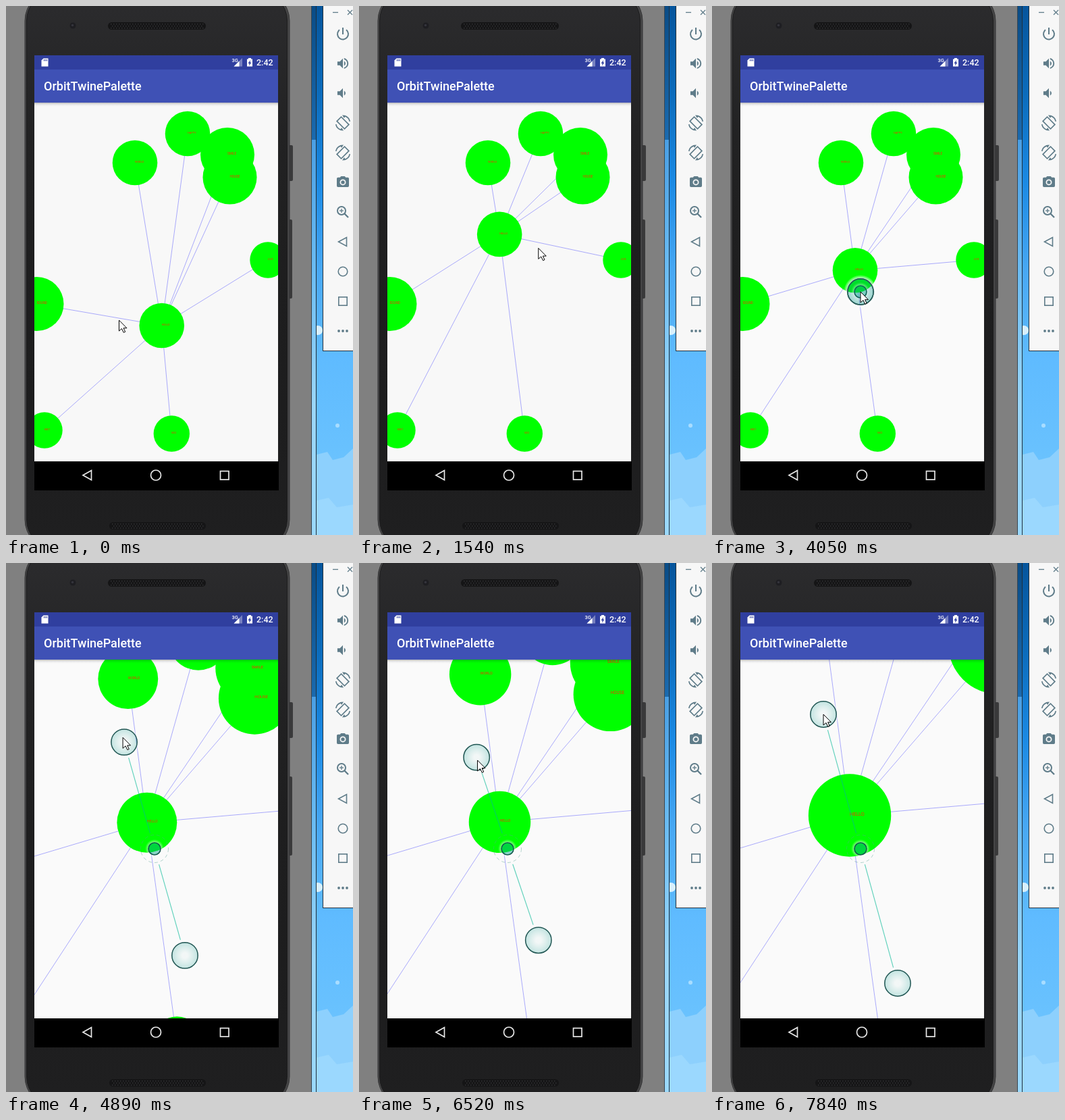
Recreate the animation shown at these times as an HTML page with a canvas. Size 514 by 783 pixels, loop 7990 ms.

```html
<!DOCTYPE html>
<html lang="en">
<head>
<meta charset="utf-8">
<title>Node graph</title>
<style>
html, body { margin: 0; width: 100%; height: 100%; overflow: hidden; background: #808080; }
canvas { display: block; width: 514px; height: 783px; }
</style>
</head>
<body>
<canvas id="stage" width="514" height="783"></canvas>
<script>
const ctx = document.getElementById('stage').getContext('2d');
const TAU = Math.PI * 2;
const LOOP = 7990;
const DRAG_END = 2240;
const PINCH_START = 3930;
const ANCHOR = { x: 220, y: 423 };
const HUB = { x: 212, y: 391.3, r: 33.3, word: 'HELLO' };

const node = (x, y, r, word) => ({ x, y, r, word });
const NODES = [
  node(191, 232, 33.3, 'WORLD'), node(269, 189, 33.3, 'HAPPY'),
  node(328, 220, 40, 'SMILE'), node(331.5, 253.5, 40, 'HOUSE'),
  node(388, 376, 26.7, 'LOVE'), node(45.5, 441, 40, 'SOUND'),
  node(57, 628, 26.7, 'MEET'), node(245.3, 633, 26.7, 'NICE')
];

// The screen refreshes in runs: first, last, steps
const RUNS = [
  [150, 1130, 8], [1280, 2240, 8], [2540, 2670, 2], [3220, 3490, 3],
  [3930, 4200, 3], [4760, 5670, 7], [5820, 6790, 8], [6930, 7840, 8]
];

// Turning points of the pinch: time, scale, finger x, finger y
const PINCH = [
  [4650, 1, 220, 423], [4912, 1.335, 175, 265], [5400, 1.84, 145, 163],
  [5958, 1.68, 144, 185], [7060, 1.05, 211, 405], [7100, 1.05, 219, 419],
  [7840, 1.838, 165, 224]
];

function snap(t) {
  let held = 0;
  for (const [first, last, steps] of RUNS) {
    const gap = (last - first) / (steps - 1);
    if (t >= first) held = first + gap * Math.min(steps - 1, Math.floor((t - first + 25) / gap));
  }
  return held;
}

function ramp(t, from, to) {
  const u = Math.min(1, Math.max(0, (t - from) / (to - from)));
  return u * u * (3 - 2 * u);
}

const mix = (a, b, u) => a + (b - a) * u;

// Cubic curve through timed keys; returns the values after the time
function at(keys, t) {
  const last = keys.length - 1;
  if (t <= keys[0][0]) return keys[0].slice(1);
  if (t >= keys[last][0]) return keys[last].slice(1);
  let i = 0;
  while (keys[i + 1][0] <= t) i++;
  const a = keys[i], b = keys[i + 1], span = b[0] - a[0], u = (t - a[0]) / span;
  const slope = (k, c) => k < 1 || k >= last ? 0
    : (keys[k + 1][c] - keys[k - 1][c]) / (keys[k + 1][0] - keys[k - 1][0]) * span;
  return a.slice(1).map((v, n) => {
    const c = n + 1, d = b[c] - v, m0 = slope(i, c), m1 = slope(i + 1, c);
    return v + u * (m0 + u * (3 * d - 2 * m0 - m1 + u * (m0 + m1 - 2 * d)));
  });
}

// One turn per second on a flattening ellipse, then rest
function drag(t) {
  const angle = TAU * (0.2 + t / 1000), rest = ramp(t, 1850, DRAG_END);
  return {
    x: mix(206 + 80 * Math.cos(angle), HUB.x, rest),
    y: mix(395 + (82 - 0.016 * t) * Math.sin(angle), HUB.y, rest)
  };
}

function hover(t) {
  const down = ramp(t, 2410, 2670), up = ramp(t, 3090, 3490);
  return { x: HUB.x + 5 * down + 3 * up, y: 390 + 51 * down - 18 * up };
}

function pose(t) {
  if (t < PINCH_START) {
    return { scale: 1, hub: drag(t), pointer: t < DRAG_END ? drag(t + 130) : hover(t) };
  }
  const [scale, x, y] = at(PINCH, t), [, px, py] = at(PINCH, t + 20), grow = scale - 1;
  return {
    scale, hub: { x: HUB.x - 9.5 * grow, y: HUB.y - 21.2 * grow },
    finger: { x, y }, pointer: { x: px, y: py }
  };
}

function paint(fill, stroke, width) {
  if (fill) { ctx.fillStyle = fill; ctx.fill(); }
  if (stroke) { ctx.strokeStyle = stroke; ctx.lineWidth = width; ctx.stroke(); }
}

function box(x, y, w, h, fill) {
  ctx.fillStyle = fill;
  ctx.fillRect(x, y, w, h);
}

function round(x, y, w, h, r, fill, stroke, width = 1) {
  ctx.beginPath();
  ctx.roundRect(x, y, w, h, r);
  paint(fill, stroke, width);
}

function disc(x, y, r, fill, stroke, width = 1) {
  ctx.beginPath();
  ctx.arc(x, y, r, 0, TAU);
  paint(fill, stroke, width);
}

function poly(points, fill, stroke, width = 1, open) {
  ctx.beginPath();
  for (let i = 0; i < points.length; i += 2) ctx.lineTo(points[i], points[i + 1]);
  if (!open) ctx.closePath();
  paint(fill, stroke, width);
}

function line(x0, y0, x1, y1, color, width) {
  poly([x0, y0, x1, y1], null, color, width, true);
}

function text(str, x, y, font, color) {
  ctx.font = font + ' Roboto, sans-serif';
  ctx.fillStyle = color;
  ctx.fillText(str, x, y);
}

function shade(g, stops) {
  stops.forEach((c, i) => g.addColorStop(i / (stops.length - 1), c));
  return g;
}

const vertical = (y0, y1, ...stops) => shade(ctx.createLinearGradient(0, y0, 0, y1), stops);
const radial = (x, y, r0, r1, ...stops) => shade(ctx.createRadialGradient(x, y, r0, x, y, r1), stops);

// Soft white ring that leaves its inside clear
function glow(x, y, r0, r1) {
  ctx.beginPath();
  ctx.arc(x, y, r1, 0, TAU);
  ctx.arc(x, y, r0, 0, TAU, true);
  paint(radial(x, y, r0, r1, 'rgba(255,255,255,.55)', 'rgba(255,255,255,0)'));
}

function drawDesktop() {
  box(0, 0, 514, 783, '#808080');
  box(452, 0, 62, 783, vertical(0, 783, '#06559c', '#0c6cbc', '#1b8ae4', '#48a8f4', '#5fbbff', '#68c1fe', '#74c8ff'));
  poly([460, 664, 476, 660, 484, 672, 500, 668, 514, 655, 514, 783, 460, 783], '#8dd0fd');
  poly([460, 732, 478, 728, 490, 742, 514, 738, 514, 783, 460, 783], '#9bd8fe');
  disc(462, 480, 7, '#d8f0ff');
  disc(491, 621, 3, '#a9ddff');
  box(453, 0, 6, 198, vertical(0, 198, '#0a4c86', '#1b6aae'));
  box(453, 198, 6, 585, vertical(198, 783, '#4a9fe4', '#6bbcf2', '#9ad6f8', '#9ad8fc'));
  box(452, 0, 1, 783, '#3a4650');
  box(459, 0, 1, 783, '#20303c');
}

function drawGrille(x, y, w) {
  round(x, y, w, 11, 5.5, '#151516');
  ctx.fillStyle = '#333335';
  for (let row = 0; row < 3; row++) {
    for (let i = 4 + row % 2 * 2; i < w - 4; i += 4) ctx.fillRect(x + i, y + 2 + row * 3, 1.5, 1.5);
  }
}

function drawPhone() {
  round(418, 206, 7, 53, 2, '#3a3a3b');
  round(418, 316, 6, 117, 2, '#3a3a3b');
  round(28, -24, 392, 830, 46, '#454546', '#353536');
  round(30.5, -22, 386, 826, 44, vertical(0, 783, '#2b2b2d', '#222223', '#1e1e1f', '#1d1d1e', '#1f1f20'), '#1b1b1c');
  disc(99, 29, 4.5, '#1e1e22');
  disc(98.5, 28.5, 1.8, '#34343c');
  drawGrille(151, 24, 145);
  drawGrille(153, 764, 143);
}

function drawBars() {
  box(42, 143, 361, 6, vertical(143, 149, 'rgba(0,0,0,.24)', 'rgba(0,0,0,.05)', 'rgba(0,0,0,0)'));
  box(42, 73, 361, 21, '#303f9f');
  box(42, 94, 361, 49, '#3f51b5');
  box(42, 674, 362, 43, '#000');
  text('OrbitTwinePalette', 56, 125, '500 18px', '#fff');
  text('2:42', 371, 88, '500 12.5px', '#fff');
  text('3G', 334.5, 83, '500 7.5px', '#fff');
  poly([55.5, 77.5, 62.5, 77.5, 62.5, 89.5, 52.5, 89.5, 52.5, 80.5], '#fff');
  for (const x of [56, 58, 60]) box(x, 79, 1, 2.5, '#303f9f');
  poly([350, 77, 350, 89.5, 337.5, 89.5], 'rgba(255,255,255,.35)');
  poly([345.5, 81.5, 345.5, 89.5, 337.5, 89.5], '#fff');
  box(357, 78.5, 8, 11, '#fff');
  box(359, 77, 4, 2, '#fff');
  poly([362, 80, 358.5, 85, 360.5, 85, 360, 88.5, 363.5, 83.5, 361.5, 83.5], '#303f9f');
  poly([114, 694.5, 126.5, 687.5, 126.5, 701.5], null, '#e8e8e8', 1.7);
  disc(222, 694.5, 7.5, null, '#e8e8e8', 1.7);
  ctx.strokeRect(317.5, 688.5, 12.5, 12.5);
}

function glyph(y, path, color) {
  ctx.save();
  ctx.translate(499 - 10.8, y - 10.8);
  ctx.scale(0.9, 0.9);
  ctx.fillStyle = color;
  ctx.fill(new Path2D(path), 'evenodd');
  ctx.restore();
}

function rotateGlyph(y, flip, color) {
  ctx.save();
  ctx.translate(499, y);
  ctx.scale(flip, 1);
  ctx.rotate(-Math.PI / 4);
  ctx.strokeStyle = color;
  ctx.lineWidth = 1.7;
  ctx.strokeRect(-4.5, -8, 9, 16);
  ctx.rotate(Math.PI / 4);
  for (const side of [0, Math.PI]) {
    ctx.rotate(side);
    ctx.beginPath();
    ctx.arc(0, 0, 10.5, -1.4, -0.2);
    ctx.stroke();
    poly([-1, -11.5, 4, -11, 2, -7], color);
  }
  ctx.restore();
}

function drawToolbar() {
  const ink = '#5f7c89';
  const speaker = 'M3 9v6h4l5 5V4L7 9z M14 8v8a4.5 4.5 0 0 0 0-8z';
  box(469, 0, 45, 511, '#25323c');
  box(470, 0, 44, 510, '#f7f7f7');
  line(484, 9.5, 492, 9.5, ink, 1.3);
  line(506, 6, 513, 13, ink, 1.3);
  line(513, 6, 506, 13, ink, 1.3);

  ctx.beginPath();
  ctx.arc(499, 41.5, 8, -0.9, Math.PI + 0.9);
  paint(null, ink, 2);
  line(499, 32, 499, 42, ink, 2);
  glyph(85, speaker + 'M14 3.2v2.1a7 7 0 0 1 0 13.4v2.1a9 9 0 0 0 0-17.6z', ink);
  glyph(129, speaker, ink);
  rotateGlyph(173, 1, ink);
  rotateGlyph(217, -1, ink);
  glyph(260, 'M20 5h-3.2L15 3H9L7.2 5H4a2 2 0 0 0-2 2v12a2 2 0 0 0 2 2h16a2 2 0 0 0 2-2V7a2 2 0 0 0-2-2z' +
    'M12 18a5 5 0 1 1 0-10a5 5 0 0 1 0 10z M12 16a3 3 0 1 1 0-6a3 3 0 0 1 0 6z', ink);
  disc(497, 303, 6, null, ink, 2);
  line(501, 307, 507, 313, ink, 2.3);
  line(494, 303, 500, 303, ink, 1.3);
  line(497, 300, 497, 306, ink, 1.3);
  poly([492.5, 349, 504.5, 342.5, 504.5, 355.5], null, ink, 1.6);
  disc(499, 393, 6.8, null, ink, 1.6);
  ctx.strokeRect(492.8, 430.8, 12.4, 12.4);
  for (const x of [493, 499, 505]) disc(x, 481, 1.9, ink);
}

function drawGraph({ scale, hub, finger }) {
  const grow = (n, x, y) => node(x, y, n.r * scale, n.word);
  const center = grow(HUB, hub.x, hub.y);
  // While dragging only the hub moves
  const nodes = finger
    ? NODES.map(n => grow(n, hub.x + scale * (n.x - HUB.x), hub.y + scale * (n.y - HUB.y)))
    : NODES;
  const all = [...nodes, center];

  ctx.save();
  ctx.beginPath();
  ctx.rect(42, 143, 361, 531);
  ctx.clip();
  box(42, 143, 361, 531, finger ? '#fafafa' : '#f8f8f8');
  for (const n of nodes) line(center.x, center.y, n.x, n.y, '#8787fb', 0.7);
  for (const n of all) disc(n.x, n.y, n.r, '#0f0');
  for (const n of all) text(n.word, n.x, n.y, `${n.r * 0.117}px`, '#f03a00');
  ctx.restore();
}

function drawFinger(x, y) {
  glow(x, y, 19, 25);
  disc(x, y, 19.2, radial(x, y, 4, 19, 'rgba(0,150,136,.03)', 'rgba(0,150,136,.12)', 'rgba(0,150,136,.22)'),
    '#215653', 1.5);
}

function drawPinch(finger) {
  const { x, y } = ANCHOR;
  const dx = finger.x - x, dy = finger.y - y, dist = Math.hypot(dx, dy);
  ctx.setLineDash([5, 4]);
  disc(x, y, 20.5, null, 'rgba(90,165,150,.5)', 0.9);
  ctx.setLineDash([]);
  if (dist > 47) {
    const near = 24 / dist, far = 1 - near;
    for (const k of [1, -1]) {
      line(x + dx * near * k, y + dy * near * k, x + dx * far * k, y + dy * far * k, 'rgba(0,185,150,.65)', 1.1);
    }
  }
  glow(x, y, 9, 14);
  disc(x, y, 9, 'rgba(0,165,140,.45)', '#12584c', 1.6);
  drawFinger(finger.x, finger.y);
  drawFinger(x - dx, y - dy);
}

function drawPointer({ x, y }) {
  ctx.save();
  ctx.translate(x, y);
  poly([0, 0, 0, 16, 4, 12.5, 6.8, 18.3, 9.2, 17.2, 6.6, 11.7, 11.5, 11.7], '#fff', '#000');
  ctx.restore();
}

function draw(now) {
  const p = pose(snap(now % LOOP));
  drawDesktop();
  drawPhone();
  drawGraph(p);
  drawBars();
  drawToolbar();
  if (p.finger) drawPinch(p.finger);
  drawPointer(p.pointer);
}

const begin = performance.now();
function tick() {
  draw(performance.now() - begin);
  requestAnimationFrame(tick);
}
tick();
</script>
</body>
</html>
```
